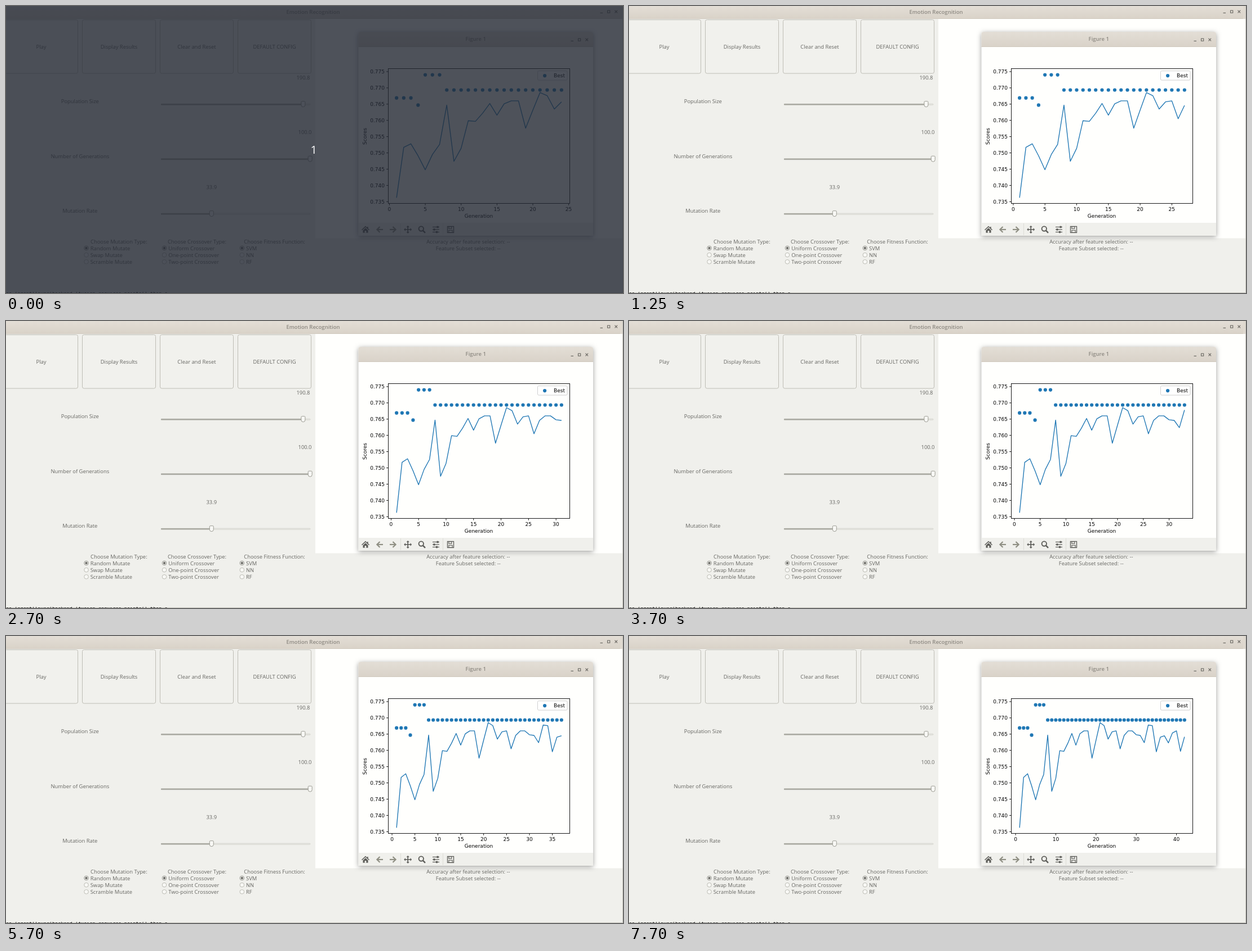
An HTML page with a canvas that plays this animation: 1095x511 px, repeating every 8000 ms.

```html
<!DOCTYPE html>
<html lang="en">
<head>
<meta charset="utf-8">
<title>Emotion Recognition</title>
<style>
  html, body { margin: 0; width: 100%; height: 100%; overflow: hidden; background: #f0f0ec; }
  canvas { display: block; }
</style>
</head>
<body>
<canvas id="stage" width="1095" height="511"></canvas>
<script>
const ctx = document.getElementById('stage').getContext('2d');
const W = 1095, H = 511, LOOP = 8000;
const UI = '"Open Sans", "Noto Sans", sans-serif';
const PLOT = '9.02px "DejaVu Sans", sans-serif';
const INK = '#666662', PANEL = '#f0f0ec', WHITE = '#fffffd', BLUE = '#1f77b4';
const ICON = '#5c5c58', PALE = '#8f8f83';

// Scores are in 1e-4 above 0.7: an uneven climb, then a plateau with sharp dips
const CLIMB = [362, 517, 528, 491, 448, 495, 526, 647, 474, 514, 599, 597, 622, 652];
const PLATEAU = 660;
const DIPS = { 15: 44, 19: 84, 23: 26, 26: 55, 30: 12, 31: 14, 32: 40, 35: 65, 37: 15, 38: 37, 41: 63 };

function meanScore(g) {
  if (g <= CLIMB.length) return CLIMB[g - 1];
  const dip = DIPS[g] || 0, before = DIPS[g - 1] || 0;
  const recovery = dip ? 0 : before ** 2 * 0.0046;
  const crest = 28 * Math.max(0, Math.cos((g - 21.3) * Math.PI / 6)) ** 8;
  return PLATEAU - dip - recovery + crest;
}
const bestScore = g => g < 4 ? 669 : g < 5 ? 647 : g < 8 ? 740 : 693.5;

// The plot refreshes twice a second; every ninth refresh covers two generations
function generations(t) {
  const k = Math.floor((t + 300) / 500);
  return 24 + k + Math.floor((k + 3) / 9);
}

const AXES = { x: 678, y: 111, w: 322, h: 240 };
const scoreY = v => 347.8 - (v - 350) * 0.5787;

function text(str, x, y, { font = `9.4px ${UI}`, color = INK, align = 'center' } = {}) {
  ctx.font = font;
  ctx.fillStyle = color;
  ctx.textAlign = align;
  ctx.fillText(str, x, y);
}

function rect(x, y, w, h, color) {
  ctx.fillStyle = color;
  ctx.fillRect(x, y, w, h);
}

function frameRect(x, y, w, h, color, width) {
  ctx.strokeStyle = color;
  ctx.lineWidth = width;
  ctx.strokeRect(x, y, w, h);
}

function line(points, color, width) {
  ctx.beginPath();
  points.forEach(([x, y]) => ctx.lineTo(x, y));
  ctx.strokeStyle = color;
  ctx.lineWidth = width;
  ctx.stroke();
}

function poly(points, color) {
  ctx.beginPath();
  points.forEach(([x, y]) => ctx.lineTo(x, y));
  ctx.fillStyle = color;
  ctx.fill();
}

function disc(x, y, r, fill, stroke, width = 1) {
  ctx.beginPath();
  ctx.arc(x, y, r, 0, Math.PI * 2);
  if (fill) { ctx.fillStyle = fill; ctx.fill(); }
  if (stroke) { ctx.strokeStyle = stroke; ctx.lineWidth = width; ctx.stroke(); }
}

function roundBox(x, y, w, h, r, fill, stroke) {
  ctx.beginPath();
  ctx.roundRect(x, y, w, h, r);
  ctx.fillStyle = fill;
  ctx.fill();
  if (!stroke) return;
  ctx.strokeStyle = stroke;
  ctx.lineWidth = 1;
  ctx.stroke();
}

// Runs a drawing routine around a new origin
function at(x, y, draw, angle = 0) {
  ctx.save();
  ctx.translate(x, y);
  ctx.rotate(angle);
  draw();
  ctx.restore();
}

function titleBar(x, w, y, h, title, radius) {
  const shade = ctx.createLinearGradient(0, y, 0, y + h);
  shade.addColorStop(0, '#e3ded6');
  shade.addColorStop(1, '#d9d2c8');
  roundBox(x, y, w, h, [radius, radius, 0, 0], shade);
  rect(x, y + h - 1, w, 1, '#d0c9be');
  text(title, x + w / 2, y + h / 2 + 2.2, { font: `600 9.5px ${UI}`, color: '#8d8982' });
}

function windowButtons(x, y) {
  const c = '#6a6862';
  at(x, y, () => {
    rect(-2.5, 1.8, 4.5, 1.2, c);
    frameRect(10.5, -2, 4.2, 4.2, c, 1.1);
    for (const s of [1, -1]) line([[23.5, -2.3 * s], [28, 2.3 * s]], c, 1.2);
  });
}

function buttons() {
  ['Play', 'Display Results', 'Clear and Reset', 'DEFAULT CONFIG'].forEach((label, i) => {
    const x = i * 138 - 2.5;
    roundBox(x, 24.5, 130, 95.5, 3, '#f1f1ed', '#bebdb5');
    text(label, x + 65, 75.5);
  });
}

function slider(label, value, knob, y, valueX = knob) {
  text(label, 131.3, y - 1.5);
  text(value, valueX, y - 44);
  roundBox(275.5, y - 0.5, 264.5, 2, 1, '#e9e9e4', '#d6d6cf');
  rect(275, y - 0.7, knob - 275, 2.4, '#aaaaa2');
  roundBox(knob - 3.5, y - 5, 7, 10, [1.5, 1.5, 3.5, 3.5], '#f8f8f5', '#9b9b93');
}

function radioGroup(title, cx, x, options) {
  text(title, cx, 423);
  options.forEach((label, i) => {
    const y = 431 + i * 12.2;
    disc(x, y, 3.8, '#f8f8f5', i ? '#bcbcb4' : '#94948d');
    if (!i) disc(x, y, 2.2, '#6e6e69');
    text(label, x + 7.2, y + 3.5, { align: 'left' });
  });
}

function drawApp() {
  rect(0, 0, W, H, PANEL);
  titleBar(0, 1090, 0, 23, 'Emotion Recognition', 0);
  rect(1090, 0, 5, 23, '#dfd9d0');
  windowButtons(1057, 10);
  rect(549, 23, 545, 390.5, WHITE);
  buttons();

  slider('Population Size', '190.8', 527.4, 174.7);
  slider('Number of Generations', '100.0', 539.7, 272.2, 530.5);
  slider('Mutation Rate', '33.9', 364.8, 369.7);

  radioGroup('Choose Mutation Type:', 200.3, 142.5, ['Random Mutate', 'Swap Mutate', 'Scramble Mutate']);
  radioGroup('Choose Crossover Type:', 339, 281, ['Uniform Crossover', 'One-point Crossover', 'Two-point Crossover']);
  radioGroup('Choose Fitness Function:', 476.5, 418.8, ['SVM', 'NN', 'RF']);

  text('Accuracy after feature selection: --', 820.3, 423);
  text('Feature Subset selected: --', 820.3, 434.7);

  rect(1094, 0, 1, H, '#c4c2bb');
  rect(0, 510, W, 1, '#c3c2bb');

  // Terminal line peeking out below the window
  ctx.save();
  ctx.beginPath();
  ctx.rect(0, 509, 290, 2);
  ctx.clip();
  text('es (agent(layer(backend (fusion requires points() then s', 0, 515,
    { font: '8.5px "DejaVu Sans Mono", monospace', color: '#000', align: 'left' });
  ctx.restore();
}

function homeIcon() {
  line([[-6.5, 0.8], [0, -5.2], [6.5, 0.8]], ICON, 1.5);
  poly([[-4.5, 1.5], [0, -2.7], [4.5, 1.5], [4.5, 5.8], [-4.5, 5.8]], ICON);
  rect(-1.4, 2.2, 2.8, 3.6, PANEL);
  rect(3, -5, 1.6, 3, ICON);
}

function arrowIcon() {
  line([[0.5, -5], [-4.6, 0], [0.5, 5]], PALE, 2.2);
  line([[-4.5, 0], [6, 0]], PALE, 2.2);
}

function moveIcon() {
  for (let i = 0; i < 4; i++) {
    ctx.rotate(Math.PI / 2);
    rect(0, -0.8, 5, 1.6, ICON);
    poly([[7, 0], [4.3, 2.7], [4.3, -2.7]], ICON);
  }
}

function zoomIcon() {
  disc(-1.2, -1.4, 4.2, null, ICON, 1.9);
  line([[1.8, 1.6], [6, 5.8]], ICON, 2.4);
}

function slidersIcon() {
  [3, -3, 1.5].forEach((knob, i) => {
    const y = (i - 1) * 4.5;
    rect(-6, y - 0.6, 12, 1.2, ICON);
    rect(knob - 1.5, y - 1.7, 3, 3.4, ICON);
  });
}

function saveIcon() {
  frameRect(-5.5, -5.5, 11, 11, ICON, 1.3);
  frameRect(-3.2, 1.3, 6.4, 4, ICON, 1.1);
  frameRect(-3.2, -5.3, 5, 3.6, ICON, 1.1);
}

function drawToolbar() {
  const y = 398;
  rect(625.5, 386, 416.5, 23, PANEL);
  for (const x of [700, 775]) rect(x, 387, 1, 21, '#dcdcd6');
  at(638, y, homeIcon);
  at(663, y, arrowIcon);
  at(687, y, arrowIcon, Math.PI);
  at(713.2, y, moveIcon);
  at(738, y, zoomIcon);
  at(763, y, slidersIcon);
  at(789, y, saveIcon);
}

function drawFigure() {
  ctx.save();
  ctx.shadowColor = 'rgba(0,0,0,.38)';
  ctx.shadowBlur = 9;
  ctx.shadowOffsetY = 2;
  roundBox(625.5, 46, 416.5, 363, [4, 4, 0, 0], WHITE);
  ctx.restore();
  titleBar(625.5, 416.5, 46, 27, 'Figure 1', 4);
  windowButtons(1005, 60);
  drawToolbar();
}

function drawPlot(count) {
  const black = { font: PLOT, color: '#000' };
  const pad = 0.05 * (count - 1);
  const low = 1 - pad, span = count - 1 + 2 * pad;
  const genX = g => AXES.x + AXES.w * (g - low) / span;
  const gens = Array.from({ length: count }, (_, i) => i + 1);

  const step = span / 9 > 5 ? 10 : 5;
  for (let g = 0; g <= low + span; g += step) {
    const x = genX(g);
    rect(x - 0.4, 351, 0.9, 3.4, '#000');
    text(g, x, 364.5, black);
  }
  for (let v = 350; v <= 750; v += 50) {
    const y = scoreY(v);
    rect(674.6, y - 0.4, 3.4, 0.9, '#000');
    text((0.7 + v / 1e4).toFixed(3), 671.5, y + 3.2, { ...black, align: 'right' });
  }

  ctx.lineJoin = 'round';
  line(gens.map(g => [genX(g), scoreY(meanScore(g))]), BLUE, 1.35);
  ctx.lineJoin = 'miter';
  gens.forEach(g => disc(genX(g), scoreY(bestScore(g)), 3.1, BLUE));

  frameRect(AXES.x, AXES.y, AXES.w, AXES.h, '#000', 0.9);
  text('Generation', 838.5, 376.8, black);
  at(639.3, 231.5, () => text('Scores', 0, 0, black), -Math.PI / 2);

  roundBox(943, 115, 52.5, 16.5, 2, 'rgba(255,255,255,.8)', '#d0d0d0');
  disc(955.6, 123.6, 3.1, BLUE);
  text('Best', 971.6, 126.2, { ...black, align: 'left' });
}

function drawCountdown() {
  rect(0, 0, W, H, 'rgba(34,39,50,.8)');
  text('1', 546.3, 263, { font: `20px ${UI}`, color: '#fff' });
}

let begin = null;
function frame(now) {
  begin ??= now;
  const t = (now - begin) % LOOP;
  drawApp();
  drawFigure();
  at(0.5, 0.5, () => drawPlot(generations(t)));
  if (t < 50) drawCountdown();
  requestAnimationFrame(frame);
}
requestAnimationFrame(frame);
</script>
</body>
</html>
```
